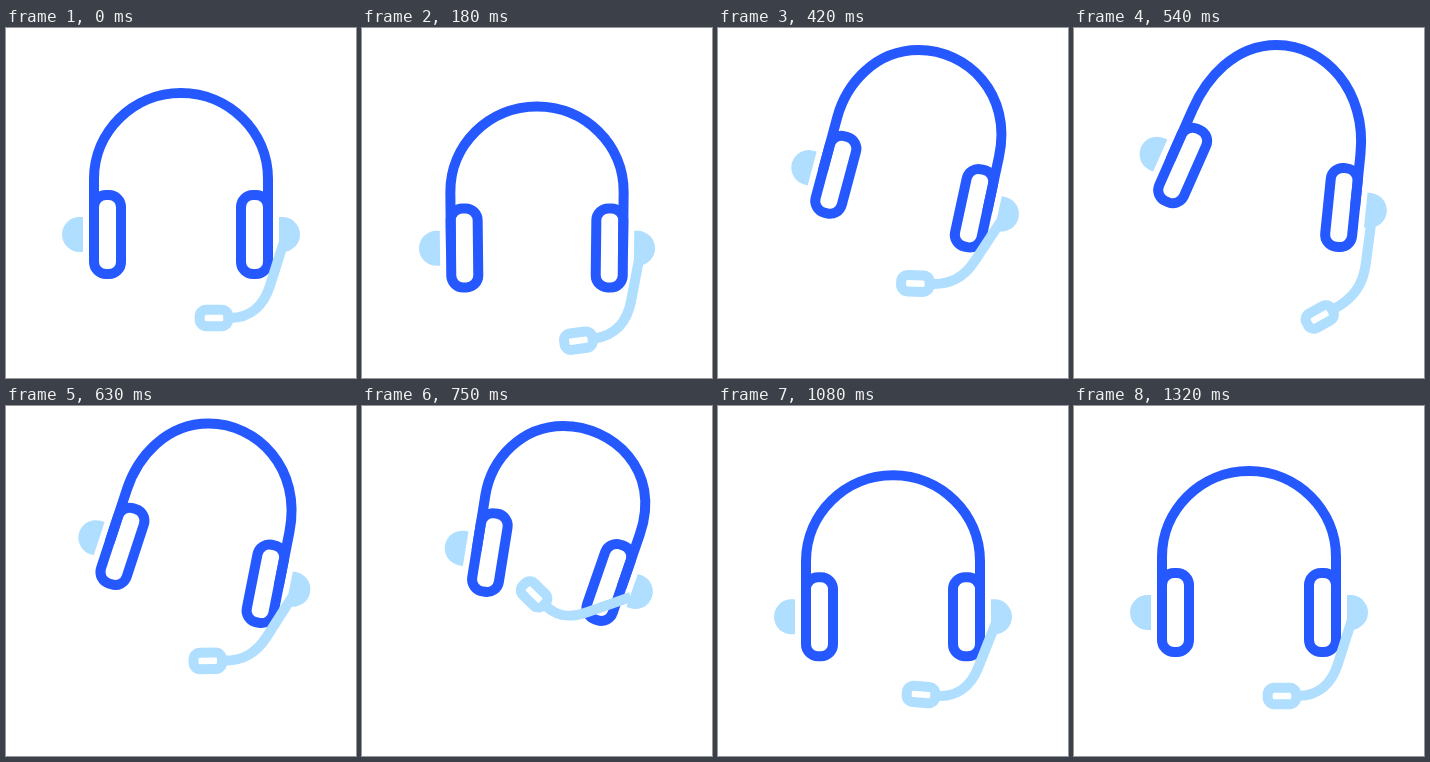
Write an HTML page that moves like this. It is 350 px wide and 350 px high and loops after 1.43 s.

```html
<!DOCTYPE html>
<html lang="en">
<head>
<meta charset="utf-8">
<title>Headset</title>
<style>
  html, body { margin: 0; width: 100%; height: 100%; overflow: hidden; background: #fff; }
  svg { display: block; width: 100vw; height: 100vh; }
  .line { fill: none; stroke-width: 10; stroke-linejoin: round; }
  .blue { stroke: #2559ff; }
  .pale { stroke: #b0deff; }
  .disc { fill: #b0deff; }
</style>
</head>
<body>
<svg viewBox="0 0 350 350">
  <defs>
    <g id="cup">
      <path class="disc" d="M24.5 -17.5h3.5a17.5 17.5 0 0 1 0 35h-3.5z"/>
      <rect class="line blue" x="-13.5" y="-39.5" width="27" height="79" rx="12"/>
    </g>
  </defs>
  <path id="band" class="line blue"/>
  <use id="left" href="#cup"/>
  <use id="right" href="#cup"/>
  <path id="boom" class="line pale"/>
  <rect id="mic" class="line pale" x="-14.25" y="-8.25" width="28.5" height="16.5" rx="6.5"/>
</svg>
<script>
const LOOP = 1430, STEP = 30, END = 1320;

// [time, value] turning points of the three motions
const LIFT = [[0, 0], [150, -18], [300, 31], [540, 48], [750, 45], [870, 24], [970, -8], [1200, 0]];
const PINCH = [[0, 0], [150, 0], [300, 6.2], [540, -9], [750, 5], [870, -4.7], [1040, 0]];
const SWING = [[0, 0], [150, -12], [300, 38], [540, -14.5], [750, 49], [870, -4], [1080, 4], [END, 0]];

const $ = id => document.getElementById(id);
const rad = deg => deg * Math.PI / 180;
const pt = p => p.map(v => v.toFixed(2)).join(" ");
const add = (p, d, k = 1) => [p[0] + d[0] * k, p[1] + d[1] * k];
const turn = ([x, y], deg) => {
  const c = Math.cos(rad(deg)), s = Math.sin(rad(deg));
  return [x * c - y * s, x * s + y * c];
};
const place = (id, p, deg, flip = 1) =>
  $(id).setAttribute("transform", `translate(${pt(p)}) rotate(${deg.toFixed(2)}) scale(${flip} 1)`);

// Smooth curve through the points, flat at every extreme
function follow(track, t) {
  const last = track.length - 1;
  if (t >= track[last][0]) return track[last][1];
  const rate = i => (track[i + 1][1] - track[i][1]) / (track[i + 1][0] - track[i][0]);
  const slope = i => {
    if (i === 0 || i === last) return 0;
    const a = rate(i - 1), b = rate(i);
    return a * b > 0 ? 2 * a * b / (a + b) : 0;
  };
  const i = track.findIndex((key, n) => t < track[n + 1][0]);
  const [t0, from] = track[i], [t1, to] = track[i + 1];
  const span = t1 - t0, u = (t - t0) / span, v = 1 - u;
  return from * v * v * (1 + 2 * u) + to * u * u * (3 - 2 * u)
    + span * u * v * (v * slope(i) - u * slope(i + 1));
}

// One side of the band: foot on the cup, upper end, and the two handles
function side(cup, tilt, top, dir) {
  const at = y => add(cup, turn([dir * 13.5, y], tilt));
  const end = at(-55.5);
  const bulge = 0.5523 + dir * Math.sin(rad(tilt)) * (dir > 0 ? 0.25 : 0.1);
  return {
    foot: at(0), end,
    low: add(end, turn([0, -1], tilt), bulge * (end[1] - top[1])),
    high: [top[0] + bulge * (end[0] - top[0]), top[1]]
  };
}

function draw(t) {
  const lift = follow(LIFT, t), pinch = follow(PINCH, t), swing = follow(SWING, t);

  // The headset leans as it rises; pinching brings the cups together
  const lean = 0.67 * Math.max(lift, 0) ** 0.8;
  const mid = [175 + 0.88 * lean, 206.5 - lift];
  const top = add(mid, [lean, -141.5]);
  const half = turn([73.5 - 1.5 * (pinch + 0.22 * lean), 0], lean);
  const left = add(mid, half, -1), right = add(mid, half);
  const tiltL = lean - pinch, tiltR = lean + pinch;

  const l = side(left, tiltL, top, -1), r = side(right, tiltR, top, 1);
  $("band").setAttribute("d",
    `M${pt(l.foot)}L${pt(l.end)}C${pt(l.low)} ${pt(l.high)} ${pt(top)}` +
    `C${pt(r.high)} ${pt(r.low)} ${pt(r.end)}L${pt(r.foot)}`);
  place("left", left, tiltL, -1);
  place("right", right, tiltR);

  // The microphone hangs from the right disc
  const hub = add(right, turn([28, 0], tiltR));
  const mic = add(hub, turn([0, 1], 39.4 + swing), 108 - 0.25 * swing + 0.4 * lean);
  const tip = 1.15 * swing - 0.85 * lean, arm = swing + 0.3 * lean;
  const dir = turn([0, 1], 17.6 + arm), axis = turn([1, 0], tip);
  const start = add(hub, turn([1.5, 7], arm));
  const bend = add(start, dir, 47), end = add(mic, axis, 16);
  const h = 0.4 * Math.hypot(bend[0] - end[0], bend[1] - end[1]);
  $("boom").setAttribute("d",
    `M${pt(start)}L${pt(bend)}C${pt(add(bend, dir, h))} ${pt(add(end, axis, h))} ${pt(end)}`);
  place("mic", mic, tip);
}

const began = performance.now();
function tick() {
  const t = (performance.now() - began) % LOOP;
  draw(Math.min(Math.floor(t / STEP) * STEP, END));
  requestAnimationFrame(tick);
}
tick();
</script>
</body>
</html>
```
